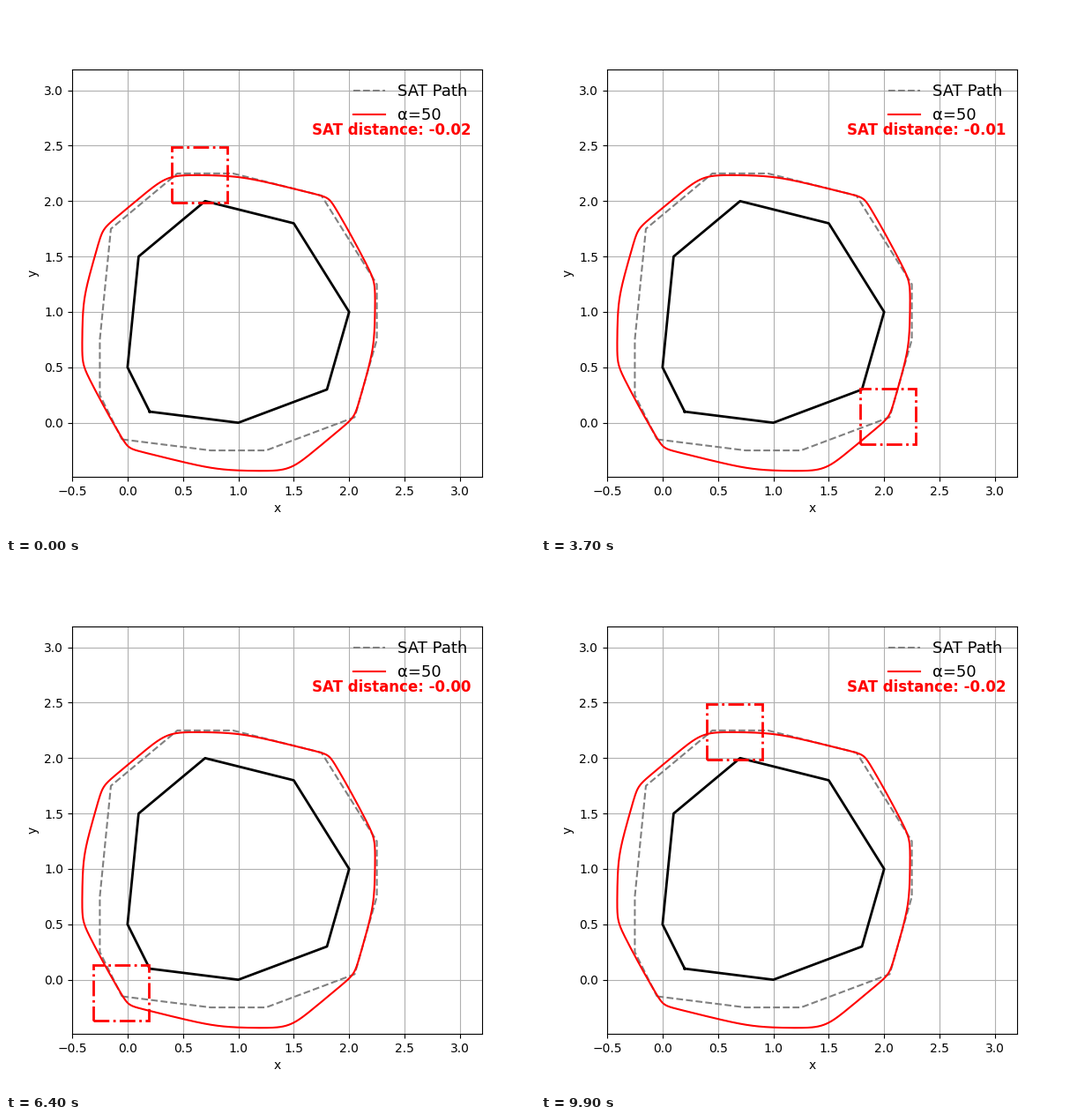
Animation of 600x600 px, one loop 10 s. Source, as a matplotlib script:

```python
import numpy as np
import matplotlib.pyplot as plt
from matplotlib.animation import FuncAnimation
from matplotlib.patches import Rectangle

FRAMES, STEP_MS = 100, 100
ALPHA = 50
HALF = 0.25     # half side of the moving box
GRID = 0.02     # spacing of the stops along the path

poly = np.array([(0.2, 0.1), (1, 0), (1.8, 0.3), (2, 1),
                 (1.5, 1.8), (0.7, 2), (0.1, 1.5), (0, 0.5)])
box = HALF * np.array([(-1, -1), (1, -1), (1, 1), (-1, 1)])
center = poly.mean(axis=0)


def normals(shape):
    edge = np.roll(shape, -1, axis=0) - shape
    n = np.column_stack((edge[:, 1], -edge[:, 0]))
    return n / np.hypot(*n.T)[:, None]


def close(pts):
    return np.vstack((pts, pts[:1]))


box_axes, poly_axes = normals(box), normals(poly)
axes = np.vstack((box_axes, poly_axes))
reach = (np.abs((poly - center) @ axes.T).max(axis=0)
         + np.abs(box @ axes.T).max(axis=0))


def smooth_gap(rel):
    """Log-sum-exp of the gaps for box centres relative to the polygon centre."""
    gaps = np.abs(rel @ axes.T) - reach
    return np.log(np.exp(ALPHA * gaps).sum(axis=1)) / ALPHA


def sat_distance(p):
    """Gap on the first separating axis, else the smallest penetration."""
    gaps = []
    for n in axes:
        a, b = poly @ n, (p + box) @ n
        gap = max(b.min() - a.max(), a.min() - b.max())
        if gap > 0:
            return gap
        gaps.append(gap)
    return max(gaps)


def smooth_path(start, count=2400):
    """Zero level of smooth_gap, clockwise, found by bisection along rays."""
    first = np.arctan2(*(start - center)[::-1])
    t = first - np.linspace(0, 2 * np.pi, count + 1)
    rays = np.column_stack((np.cos(t), np.sin(t)))
    lo, hi = np.full(t.size, 0.5), np.full(t.size, 2.5)
    for _ in range(40):
        mid = (lo + hi) / 2
        inside = smooth_gap(mid[:, None] * rays) < 0
        lo, hi = np.where(inside, mid, lo), np.where(inside, hi, mid)
    return center + lo[:, None] * rays


def sat_path():
    """Polygon grown by the box: each corner follows its two edge normals."""
    pts = []
    for v, n0, n1 in zip(poly, np.roll(poly_axes, 1, axis=0), poly_axes):
        for n in (n0, n1):
            p = v + HALF * np.sign(n)
            if not any(np.allclose(p, q) for q in pts):
                pts.append(p)
    return np.array(pts)


path = smooth_path(np.array([0.651, 2.2341]))
# grid-crossing length: steps are even in |dx| + |dy|
length = np.concatenate(([0], np.abs(np.diff(path, axis=0)).sum(axis=1).cumsum()))


def position(i):
    s = length[-1] * i / (FRAMES - 1)
    if i < FRAMES - 1:
        s = np.floor(s / GRID) * GRID
    return np.array([np.interp(s, length, path[:, k]) for k in (0, 1)])


fig, ax = plt.subplots(figsize=(6, 6), dpi=100)
span = 3.7 * 462 / 465
ax.set_xlim(-0.5, 3.2)
ax.set_ylim(1.35 - span / 2, 1.35 + span / 2)
ax.set_xlabel("x")
ax.set_ylabel("y")
ax.grid(True)

ax.plot(*close(poly).T, color="black", lw=2)
ax.plot(*close(sat_path()).T, "--", color="gray", lw=1.5, label="SAT Path")
ax.plot(*path.T, color="red", lw=1.5, label=f"α={ALPHA}")
ax.legend(loc="upper right", fontsize=13, frameon=False)

frame = Rectangle((0, 0), 2 * HALF, 2 * HALF, fill=False,
                  edgecolor="red", lw=2, ls="-.", zorder=3)
ax.add_patch(frame)
label = ax.text(3.1, 2.6, "", ha="right", fontsize=12, fontweight="bold")


def update(i):
    p = position(i)
    dist = sat_distance(p)
    frame.set_xy(p - HALF)
    label.set_text(f"SAT distance: {dist:.2f}")
    label.set_color("red" if dist < 0 else "green")
    return frame, label


anim = FuncAnimation(fig, update, frames=FRAMES, interval=STEP_MS,
                     repeat=True, repeat_delay=0)
plt.show()
```
